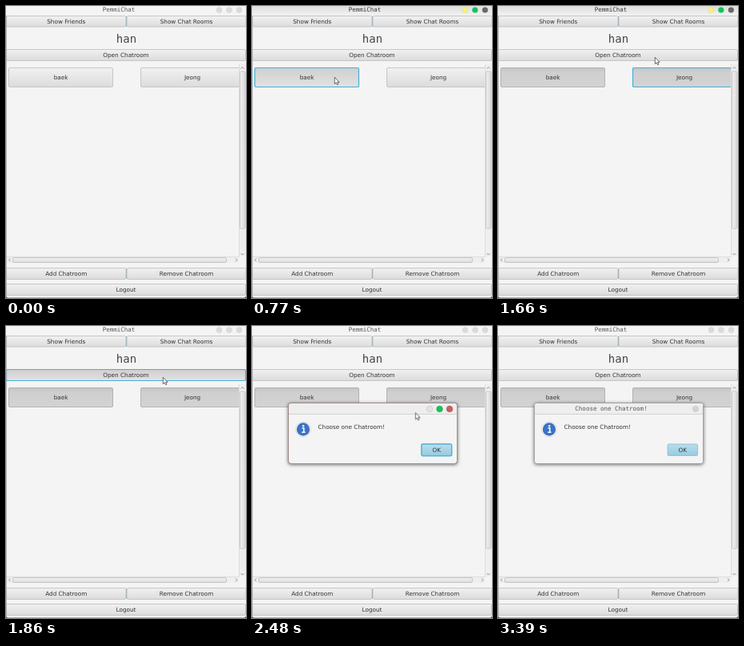
Write an HTML page that moves like this. It is 300 px wide and 366 px high and loops after 3440 ms.

```html
<!DOCTYPE html>
<html lang="en">
<head>
<meta charset="utf-8">
<title>Chat rooms</title>
<style>
  html, body { margin: 0; width: 100%; height: 100%; overflow: hidden; background: #f4f4f4; }
  svg { display: block; width: 300px; height: 366px; }
  text { font: 7.25px "DejaVu Sans", sans-serif; fill: #333; text-anchor: middle; }
  .title { font: 7.5px "DejaVu Sans Mono", monospace; fill: #555; }
  .user { font: 14px "DejaVu Sans Mono", monospace; fill: #444; }
  .ring { fill: none; stroke: #45b0d9; stroke-width: 1.2; }
  .arrow { fill: none; stroke: #888; stroke-width: .9; }
  #frame { filter: drop-shadow(0 1px 2px rgba(0, 0, 0, .55)); }
</style>
</head>
<body>
<svg viewBox="0 0 300 366">
  <defs>
    <linearGradient id="up" x2="0" y2="1">
      <stop stop-color="#f1f1f1"/><stop offset="1" stop-color="#dcdcdc"/>
    </linearGradient>
    <linearGradient id="armed" x2="0" y2="1">
      <stop stop-color="#cfcfcf"/><stop offset="1" stop-color="#e2e2e2"/>
    </linearGradient>
    <linearGradient id="down" x2="0" y2="1">
      <stop stop-color="#c4c4c4"/><stop offset=".25" stop-color="#cfcfcf"/><stop offset="1" stop-color="#d3d3d3"/>
    </linearGradient>
    <linearGradient id="bar" x2="0" y2="1">
      <stop stop-color="#dedede"/><stop offset="1" stop-color="#f2f2f2"/>
    </linearGradient>
    <linearGradient id="thumb" x2="1" y2="0">
      <stop stop-color="#f0f0f0"/><stop offset="1" stop-color="#dadada"/>
    </linearGradient>
    <linearGradient id="ok" x2="0" y2="1">
      <stop stop-color="#b9deec"/><stop offset="1" stop-color="#97cae0"/>
    </linearGradient>
    <clipPath id="list"><path d="M0 72H292V314H0z"/></clipPath>
  </defs>

  <path d="M0 0H300V366H0z" fill="#f4f4f4"/>
  <text class="title" x="141" y="7.3">PemmiChat</text>
  <g fill="#dadada"><circle cx="266.5" cy="5" r="3.8"/><circle cx="279" cy="5" r="3.8"/><circle cx="291.5" cy="5" r="3.8"/></g>
  <g id="focused">
    <path d="M0 0H300V12H0z" fill="url(#bar)"/>
    <text class="title" x="141" y="7.3" style="fill:#333">PemmiChat</text>
    <circle cx="266.3" cy="5" r="3.6" fill="#f6f183" stroke="#d8d080" stroke-width=".4"/>
    <circle cx="278.8" cy="5" r="3.6" fill="#0cc55c"/>
    <circle cx="291.3" cy="5" r="3.6" fill="#686868"/>
  </g>

  <g id="buttons"></g>
  <text class="user" x="150.5" y="46">han</text>
  <path d="M150.5 13V26M150.5 329V342" stroke="#a3b4be"/>

  <g id="rooms" clip-path="url(#list)"></g>

  <path d="M291.5 73V314.5M0 314.5H291" fill="none" stroke="#dcdcdc"/>
  <path d="M292 73H300V314H292zM1 315H291V322H1z" fill="#efefef"/>
  <rect x="292.5" y="82" width="6.5" height="197" rx="1.5" fill="url(#thumb)" stroke="#bebebe" stroke-width=".8"/>
  <rect x="8.5" y="315.5" width="267" height="6" rx="1.5" fill="url(#up)" stroke="#bebebe" stroke-width=".8"/>
  <path class="arrow" d="M293.5 78.5l2-2 2 2M293.5 310l2 2 2-2M5.5 316.3l-2 2 2 2M287 316.3l2 2-2 2"/>
  <path d="M.5 12V364" stroke="#a9a9a9" stroke-width=".8"/>
  <path d="M0 365.5H300" stroke="#b5b2b0"/>
  <path d="M0 364v2h2zM300 364v2h-2z" fill="#4a4442"/>

  <g id="dialog">
    <rect id="frame" x="45.5" y="96.5" width="211" height="76" rx="3" fill="#f4f4f4" stroke="#a2a2a2"/>
    <path d="M46 110.5V99.5q0-2.5 2.5-2.5H253.5q2.5 0 2.5 2.5V110.5z" fill="#eee"/>
    <path d="M46 110.5H256" stroke="#d2d2d2"/>
    <g id="active">
      <rect x="45.5" y="96.5" width="211" height="76" rx="3" fill="none" stroke="#a08c88"/>
      <path d="M48 172.5H254" stroke="#c08a80"/>
      <circle cx="222" cy="104" r="3.7" fill="#e4e4e4" stroke="#c4c4c4" stroke-width=".7"/>
      <circle cx="234.5" cy="104" r="3.8" fill="#13c45e" stroke="#28a058" stroke-width=".6"/>
      <circle cx="247" cy="104" r="3.8" fill="#c9605c" stroke="#a85050" stroke-width=".6"/>
    </g>
    <g id="idle">
      <text class="title" x="141.5" y="106">Choose one Chatroom!</text>
      <circle cx="247" cy="104" r="4" fill="#d2d2d2"/>
    </g>
    <circle cx="64" cy="129.5" r="9.5" fill="#fff" stroke="#c6cbd2" stroke-width=".7"/>
    <circle cx="64" cy="129.5" r="8.2" fill="#3b73c4"/>
    <path d="M62.5 128H64.8V133M62.2 133.3H66.5" fill="none" stroke="#fff" stroke-width="1.5"/>
    <circle cx="64.2" cy="125.3" r="1.2" fill="#fff"/>
    <text x="82.5" y="128.5" style="text-anchor:start">Choose one Chatroom!</text>
    <rect x="212" y="148" width="37.5" height="14.5" rx="1.5" fill="url(#ok)" stroke="#8db9cb" stroke-width=".8"/>
    <rect id="okRing" class="ring" x="211.8" y="147.8" width="38" height="15" rx="2"/>
    <text x="230.7" y="158">OK</text>
  </g>

  <g id="cursor">
    <circle id="click" cx="-.5" cy=".5" r="7.5" fill="#ebe44e" fill-opacity=".78"/>
    <path d="M.3 .3V8.600L2.200 7 3.500 9.700 4.900 9.100 3.600 6.400H6z" fill="#fff" stroke="#484848" stroke-width=".8"/>
  </g>
</svg>
<script>
const LOOP = 3440;
const get = id => document.getElementById(id);

function button(host, id, label, x, y, w, h, cx = x + w / 2) {
  const box = `x="${x}" y="${y}" width="${w}" height="${h}" rx="1.5"`;
  get(host).insertAdjacentHTML('beforeend', `
    <rect ${box} fill="url(#up)" stroke="#bcbcbc" stroke-width=".8"/>
    <rect id="${id}Armed" ${box} fill="url(#armed)" opacity="0"/>
    <rect id="${id}Down" ${box} fill="url(#down)" stroke="#aeaeae" stroke-width=".8" opacity="0"/>
    <rect id="${id}Ring" class="ring" ${box} opacity="0"/>
    <text x="${cx}" y="${y + h / 2 + 2.6}">${label}</text>`);
}

button('buttons', 'friends', 'Show Friends', .5, 12.5, 149.5, 13.5);
button('buttons', 'list', 'Show Chat Rooms', 151, 12.5, 149, 13.5);
button('buttons', 'open', 'Open Chatroom', .5, 54.5, 299, 14);
button('buttons', 'add', 'Add Chatroom', .5, 328.5, 149.5, 14);
button('buttons', 'remove', 'Remove Chatroom', 151, 328.5, 149, 14);
button('buttons', 'logout', 'Logout', .5, 348.5, 299, 14);
button('rooms', 'left', 'baek', 3.5, 77.5, 130, 24);
button('rooms', 'right', 'Jeong', 168.5, 77.5, 130, 24, 233);

function play(id, frames) {
  get(id).animate(frames, { duration: LOOP, iterations: Infinity });
}

// Visible only inside the given [from, to] spans, with hard edges
function show(id, ...spans) {
  const frames = [{ offset: 0, opacity: 0, easing: 'step-end' }];
  for (const [from, to] of spans) {
    frames.push({ offset: from / LOOP, opacity: 1, easing: 'step-end' });
    if (to < LOOP) frames.push({ offset: to / LOOP, opacity: 0, easing: 'step-end' });
  }
  frames.push({ offset: 1, opacity: spans.at(-1)[1] < LOOP ? 0 : 1 });
  play(id, frames);
}

function fade(id, ...steps) {
  play(id, steps.map(([ms, opacity]) => ({ offset: ms / LOOP, opacity })));
}

const path = [
  [0, 238, 376], [30, 238, 362], [150, 205, 285], [300, 120, 170], [420, 64, 105],
  [550, 103, 89], [880, 103, 89], [1020, 150, 91], [1170, 189.5, 94.5],
  [1400, 189.5, 94.5], [1520, 194, 77], [1660, 196, 64], [1880, 196, 64], [2100, 197, 78.5],
  [2280, 203, 103], [2320, 203, 103], [2480, 204, 108], [2600, 214, 150],
  [2720, 230, 225], [2840, 239, 288], [2890, 239, 290], [3000, 249, 332],
  [3090, 256, 376], [LOOP, 256, 376]
];
play('cursor', path.map(([ms, x, y]) => ({ offset: ms / LOOP, transform: `translate(${x}px, ${y}px)` })));

show('click', [800, 890], [1270, 1400], [1790, 1840]);
show('focused', [660, 1840]);
show('leftArmed', [720, 880]);
show('leftDown', [880, LOOP]);
show('leftRing', [720, 1260]);
show('rightArmed', [1260, 1400]);
show('rightDown', [1400, LOOP]);
show('rightRing', [1260, 1790]);
show('openArmed', [1790, 1960]);
show('openRing', [1790, 1960]);
fade('dialog', [0, 0], [1900, 0], [2100, .86], [2230, 1], [LOOP, 1]);
for (const id of ['active', 'okRing']) fade(id, [0, 1], [3320, 1], [3385, 0], [LOOP, 0]);
fade('idle', [0, 0], [3320, 0], [3385, 1], [LOOP, 1]);
</script>
</body>
</html>
```
